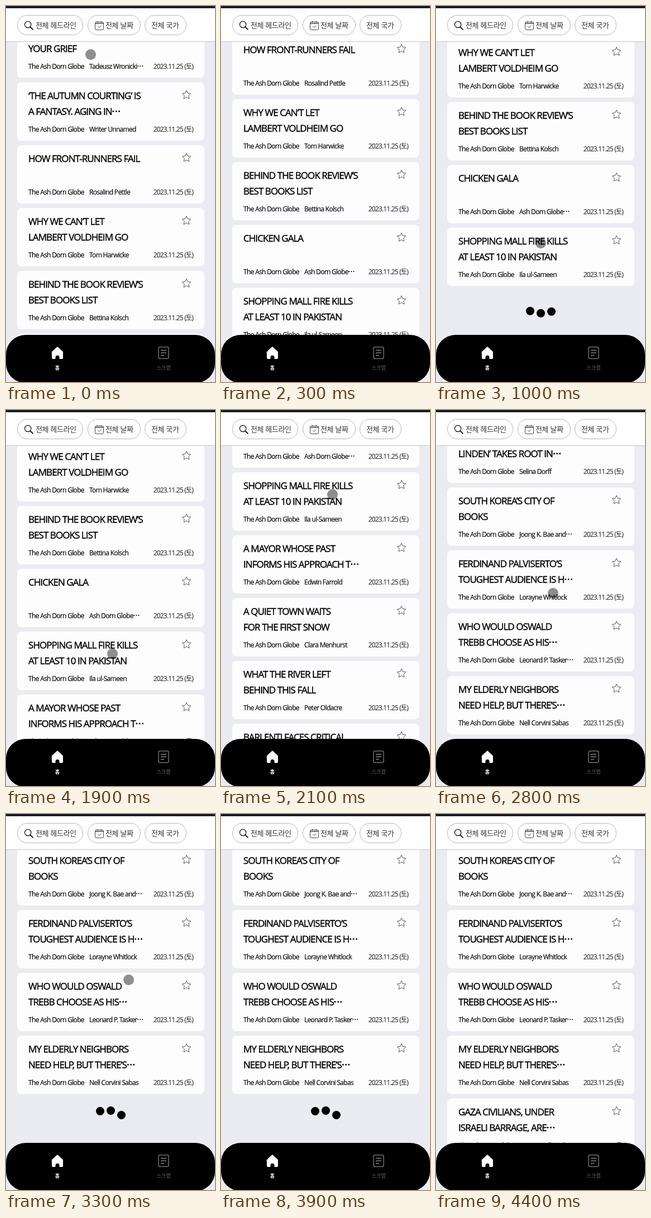
These frames come from a looping animation (374x670 px, 4.7 s). An HTML page:

```html
<!DOCTYPE html>
<html lang="ko">
<head>
<meta charset="utf-8">
<title>Headlines</title>
<style>
  html, body { margin: 0; width: 100%; height: 100%; overflow: hidden; }
  body { position: relative; background: #ebecf2; font-family: "Open Sans", "Noto Sans CJK KR", "Noto Sans CJK", sans-serif; }
  #stage { position: absolute; left: 0; top: 0; width: 374px; height: 670px; overflow: hidden; }
  #stage div, #stage span, #stage svg { position: absolute; white-space: nowrap; }
  #list { left: 0; top: 0; width: 374px; }
  .card { left: 20px; width: 335px; height: 104px; border-radius: 8px; background: #fdfdfd; color: #000; }
  .title { left: 20px; top: 9.5px; font-size: 17px; line-height: 28px; letter-spacing: -.95px; -webkit-text-stroke: .4px #000; }
  .meta { left: 20px; top: 76px; font-size: 12px; line-height: 16px; letter-spacing: -.68px; -webkit-text-stroke: .15px; }
  .meta.author { left: 129px; }
  .meta.date { left: auto; right: 20px; letter-spacing: -.8px; color: #333; }
  .card i { font-style: normal; font-weight: 600; letter-spacing: .7px; }
  .star { left: 293px; top: 12px; }
  .dot { width: 15px; height: 15px; margin: -7.5px; border-radius: 50%; background: #000; }
  #head { left: 0; top: 0; width: 374px; height: 59px; border-top: 4px solid #1c1a1f; border-bottom: 1px solid #c6c6c8; background: #fff; }
  .pill { top: 12px; height: 34px; border: 1px solid #b6b6b6; border-radius: 18px; }
  .pill span { font: 13px/34px "Noto Sans CJK KR", "Noto Sans CJK", sans-serif; letter-spacing: -.4px; color: #333; }
  #nav { left: 0; top: 586px; width: 374px; height: 86px; border-radius: 35px; background: #000; }
  .tab { top: 52px; width: 60px; text-align: center; font: 9px/14px "Noto Sans CJK KR", "Noto Sans CJK", sans-serif; }
  #touch { left: -9.5px; top: -9.5px; width: 19px; height: 19px; border-radius: 50%; background: rgba(0, 0, 0, .44); }
</style>
</head>
<body>
<div id="stage">
  <div id="list"></div>
  <div id="head">
    <div class="pill" style="left:20px;width:116px"><span style="left:32px">전체 헤드라인</span></div>
    <div class="pill" style="left:146px;width:93px"><span style="left:31px">전체 날짜</span></div>
    <div class="pill" style="left:248px;width:73px"><span style="left:11px">전체 국가</span></div>
    <svg style="left:0;top:-4px" width="374" height="64" fill="none" stroke-linecap="round">
      <g stroke="#111" stroke-width="1.2"><circle cx="39.2" cy="33" r="5.7"/><path d="M43.5 37.3 48 41.8" stroke-width="1.9"/></g>
      <g stroke="#444"><rect x="159.5" y="28.5" width="15" height="14" rx="2"/><path d="M160 31h14" stroke-width="1.5"/><path d="M163.5 27v2M170.5 27v2M164.5 36.5l2 2 3.5-3.5"/></g>
    </svg>
  </div>
  <div id="nav">
    <svg style="left:0;top:0" width="374" height="86" fill="none" stroke-linecap="round" stroke-linejoin="round">
      <path fill="#fff" stroke="#fff" d="M82.5 30 92 21.5 101.5 30V41q0 1.5-1.5 1.5H96V40a4 4 0 0 0-8 0V42.5H84q-1.5 0-1.5-1.5Z"/>
      <g stroke="#808080" stroke-width="1.3"><rect x="273" y="21.7" width="18" height="20.6" rx="2.5"/><path d="M277.5 27.5h9M277.5 32h9M277.5 36.5h5"/></g>
    </svg>
    <span class="tab" style="left:62px;color:#fff;font-weight:700">홈</span>
    <span class="tab" style="left:252px;color:#666">스크랩</span>
  </div>
  <div id="touch"></div>
</div>
<script>
const LOOP = 4700, STEP = 100, PITCH = 112;

// Title lines split by "|", a trailing "~" is an ellipsis
const articles = [
  ["LEARNING TO CARRY|YOUR GRIEF", "Tadeusz Wronicki~"],
  ["‘THE AUTUMN COURTING’ IS|A FANTASY. AGING IN~", "Writer Unnamed"],
  ["HOW FRONT-RUNNERS FAIL", "Rosalind Pettle"],
  ["WHY WE CAN’T LET|LAMBERT VOLDHEIM GO", "Tom Harwicke"],
  ["BEHIND THE BOOK REVIEW’S|BEST BOOKS LIST", "Bettina Kolsch"],
  ["CHICKEN GALA", "Ash Dorn Globe~"],
  ["SHOPPING MALL FIRE KILLS|AT LEAST 10 IN PAKISTAN", "Ila ul-Sameen"],
  ["A MAYOR WHOSE PAST|INFORMS HIS APPROACH T~", "Edwin Farrold"],
  ["A QUIET TOWN WAITS|FOR THE FIRST SNOW", "Clara Menhurst"],
  ["WHAT THE RIVER LEFT|BEHIND THIS FALL", "Peter Oldacre"],
  ["BARLENTI FACES CRITICAL|DECISION ON CRUISE SHIP~", "Dolores Vantes"],
  ["IT’S HOLIDAY WINDOW|SEASON IN NYC. HERE’S~", "Corinna Valdera~"],
  ["LENA KROSCH’S ‘DUSK OF|LINDEN’ TAKES ROOT IN~", "Selina Dorff"],
  ["SOUTH KOREA’S CITY OF|BOOKS", "Joong K. Bae and~"],
  ["FERDINAND PALVISERTO’S|TOUGHEST AUDIENCE IS H~", "Lorayne Whitlock"],
  ["WHO WOULD OSWALD|TREBB CHOOSE AS HIS~", "Leonard P. Tasker~"],
  ["MY ELDERLY NEIGHBORS|NEED HELP, BUT THERE’S~", "Nell Corvini Sabas"],
  ["GAZA CIVILIANS, UNDER|ISRAELI BARRAGE, ARE~", "Hanna Welbrook"]
];

// [time, scroll offset]
const scroll = [
  [0, 0], [100, 78], [200, 142], [300, 194], [400, 237], [500, 272], [600, 301],
  [1900, 301], [2000, 405], [2100, 585], [2200, 765], [2300, 925], [2400, 1066],
  [2500, 1120], [2600, 1168], [2700, 1258], [2800, 1342], [2900, 1398], [3000, 1421]
];

// Each touch: [time, x, y]
const touches = [
  [[0, 151, 86], [100, 150, 60]],
  [[800, 186, 432], [1000, 187, 422], [1300, 187, 422]],
  [[1900, 190, 434], [2000, 194, 330], [2100, 199, 150]],
  [[2400, 178, 549], [2500, 179, 547], [2600, 187, 500], [2700, 198, 410], [2800, 209, 326], [2900, 213, 270]],
  [[3200, 218, 300], [3300, 219, 295], [3600, 219, 295]]
];

const list = document.getElementById("list");
const touch = document.getElementById("touch");

function starPath() {
  const pts = [];
  for (let i = 0; i < 10; i++) {
    const a = i * Math.PI / 5, r = i % 2 ? 4 : 8.2;
    pts.push((10 + r * Math.sin(a)).toFixed(2) + " " + (10.5 - r * Math.cos(a)).toFixed(2));
  }
  return "M" + pts.join("L") + "Z";
}

const star = `<svg class="star" width="20" height="20" fill="none" stroke="#555" stroke-linejoin="round"><path d="${starPath()}"/></svg>`;
const rich = s => s.replace("|", "<br>").replace("~", "<i>···</i>");

function add(cls, html = "") {
  const el = document.createElement("div");
  el.className = cls;
  el.innerHTML = html;
  return list.appendChild(el);
}

const cards = articles.map(([title, author], i) => {
  const el = add("card", `<div class="title">${rich(title)}</div>${star}
    <span class="meta">The Ash Dorn Globe</span><span class="meta author">${rich(author)}</span>
    <span class="meta date">2023.11.25 (토)</span>`);
  el.style.top = 24 + PITCH * i + "px";
  return el;
});
const dots = [168.5, 187.5, 206.5].map(x => {
  const el = add("dot");
  el.style.left = x + "px";
  return el;
});

function sample(keys, t, col) {
  const n = keys.findIndex(k => k[0] > t);
  if (n < 0) return keys[keys.length - 1][col];
  const a = keys[n - 1], b = keys[n];
  return a[col] + (b[col] - a[col]) * (t - a[0]) / (b[0] - a[0]);
}

// Dip 10px, rise 10px above rest, settle
function bounce(ms) {
  const p = ((ms % 600) + 600) % 600 / 600;
  const ease = x => x * x * (3 - 2 * x);
  if (p < .33) return 10 * ease(p / .33);
  if (p < .66) return 10 - 20 * ease((p - .33) / .33);
  return -10 + 10 * ease((p - .66) / .34);
}

function draw(t) {
  const count = t < 1400 ? 7 : t < 4400 ? 17 : 18;
  list.style.transform = `translateY(${-sample(scroll, t, 1)}px)`;
  cards.forEach((el, i) => { el.style.display = i < count ? "" : "none"; });

  const clock = t - (t < 1400 ? 670 : 2781);
  dots.forEach((el, i) => {
    el.style.top = PITCH * count + 55 + bounce(clock - 70 * (i + 1)) + "px";
  });

  const path = touches.find(k => t >= k[0][0] && t <= k[k.length - 1][0]);
  touch.style.display = path ? "" : "none";
  if (path) touch.style.transform = `translate(${sample(path, t, 1)}px, ${sample(path, t, 2)}px)`;
}

const start = performance.now();
function tick() {
  const t = (performance.now() - start) % LOOP;
  draw(Math.floor(t / STEP) * STEP);
  requestAnimationFrame(tick);
}
tick();
</script>
</body>
</html>
```
